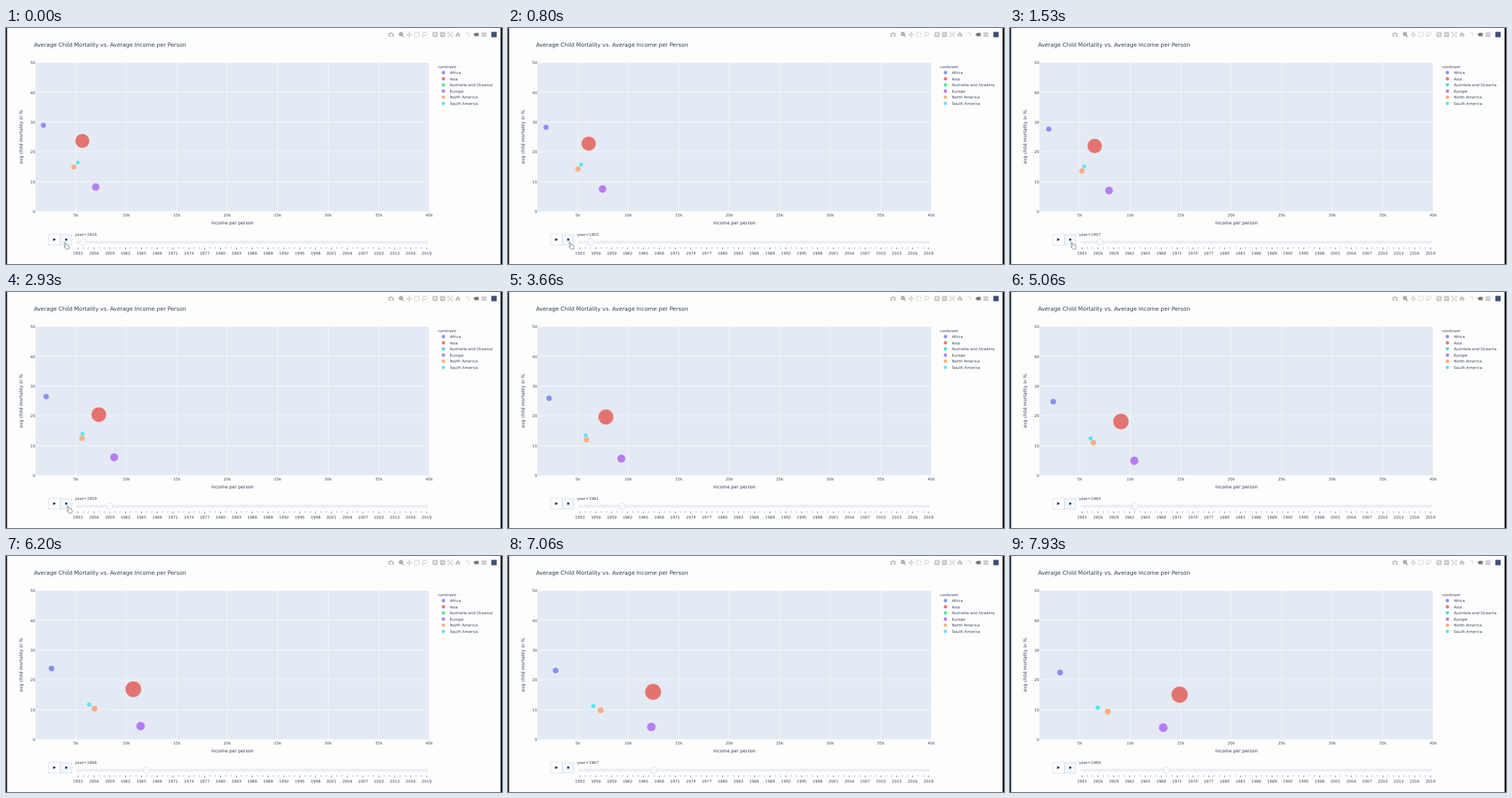
An HTML page that plays this animation: 690 by 328 pixels, repeating every 8 s.

```html
<!DOCTYPE html>
<html lang="en">
<head>
<meta charset="utf-8">
<title>Child Mortality vs. Income</title>
<style>
  html, body { margin: 0; width: 100%; height: 100%; overflow: hidden; background: #fdfdfd; }
  svg { display: block; width: 690px; height: 328px; }
  text { font: 5.38px "DejaVu Sans", Verdana, sans-serif; fill: #3a475c; white-space: pre; }
  .title { font-size: 7.69px; fill: #2c3a50; }
  .axis { font-size: 6.3px; fill: #2c3a50; }
  .mid { text-anchor: middle; }
  .end { text-anchor: end; }
  #grid { stroke: #fff; stroke-width: .55; }
  #bubbles { stroke: #f4f6fb; stroke-width: .3; }
  #ticks { stroke: #333c4c; stroke-width: .6; }
  .control { stroke: #bec8d9; stroke-width: .5; fill: #f8fafc; }
  .icons { fill: #c3c4c7; stroke: none; }
  .icons .line { fill: none; stroke: #c3c4c7; stroke-width: 1; }
  .icons .on { fill: #77797d; }
  .icons .line.on { fill: none; stroke: #77797d; }
</style>
</head>
<body>
<svg viewBox="0 0 690 328">
  <rect width="690" height="328" fill="#fdfdfd"/>
  <path d="M0 0H1.5V328H0ZM688 0H690V328H688Z" fill="#111"/>

  <g class="icons">
    <path d="M532 7h2l.7-1h2l.7 1h2v5h-7.4zM535.7 8a1.6 1.6 0 1 0 .1 0z" fill-rule="evenodd"/>
    <circle class="line on" cx="549.4" cy="8.4" r="2.3"/>
    <path class="line on" d="M551 10l2.4 2.6M548.3 8.4h2.2M549.4 7.3v2.2"/>
    <path class="line" d="M561 6v6.4M557.8 9.2h6.4"/>
    <path d="M561 5l1.5 1.8h-3zM561 13.2l1.5-1.8h-3zM557 9.2l1.8-1.5v3zM565 9.2l-1.8-1.5v3z"/>
    <rect class="line" x="568.5" y="6" width="6" height="6" stroke-dasharray="1.4 .8"/>
    <path class="line" d="M580 10.5c-2-2 0-4.5 2.8-4.5s3.7 2.4 1.6 3.8-3.6.2-4.4 1 .2 1.7 1 2"/>
    <path d="M593.3 5.7h7v6.8h-7zM596.3 7v1.6h-1.7v1h1.7v1.6h1V9.6h1.7v-1h-1.7V7z" fill-rule="evenodd"/>
    <path d="M603.8 5.7h7v6.8h-7zM605.2 8.6v1h4.2v-1z" fill-rule="evenodd"/>
    <path class="line" d="M615.3 6.3l5.4 5.6M620.7 6.3l-5.4 5.6"/>
    <path d="M614.4 5.6h2.4l-2.4 2.4zM621.6 5.6h-2.4l2.4 2.4zM614.4 12.6h2.4l-2.4-2.4zM621.6 12.6h-2.4l2.4-2.4z"/>
    <path d="M628.7 5.4l4 3.8h-1v3.3h-2.1v-2.3h-1.8v2.3h-2.1V9.2h-1z"/>
    <path class="line" d="M639 7h5M643.5 7v5.4" stroke-dasharray="1.5 .8"/>
    <path class="on" d="M650.4 9l2-2.3h5.2v4.7h-5.2z"/>
    <path d="M661 7.2l1-1h6.2v2.5H662zM661 10.8l1-1.2h6.2v2.6H662z"/>
  </g>
  <rect x="675.2" y="5.4" width="7.4" height="7.4" fill="#3f4f75"/>

  <text class="title" x="39" y="26">Average Child Mortality vs. Average Income per Person</text>
  <rect x="41" y="48" width="548" height="207" fill="#e4eaf3"/>
  <g id="grid"></g>
  <g id="labels"></g>
  <text class="axis mid" x="315" y="273.2">income per person</text>
  <text class="axis mid" transform="translate(22.8 151.5) rotate(-90)">avg child mortality in %</text>
  <text x="601" y="55.6">continent</text>
  <g id="legend"></g>
  <g id="bubbles"></g>

  <rect class="control" x="59.2" y="287" width="16.4" height="14.5" style="fill:#fff"/>
  <rect class="control" x="75.6" y="287" width="16.2" height="14.5" style="fill:#f1f7fd"/>
  <path d="M65.5 292l4.2 2.1-4.2 2.1zM82.3 292.7h2.9v2.9h-2.9z" fill="#1f2f4a"/>
  <text id="year" x="96" y="289.4"></text>
  <rect class="control" x="98.3" y="296.5" width="488" height="2.3" rx="1.1"/>
  <g id="ticks"></g>
  <circle id="handle" class="control" cy="297.7" r="4.5"/>
  <path id="cursor" d="M1.6 .6q.9-.7 1.4.4l.9 3 .5-.3q.7-.2 1 .5.8-.5 1.3.3.9-.2 1.2.7l.5 2q.1 1-.4 2.4l-3.7.8q-1-1.4-2.6-2.6-1-.9-.2-1.3.5-.2 1.6.6L1.4 1.9q-.2-.9.2-1.3z"
        fill="#fff" stroke="#444" stroke-width=".6"/>
</svg>
<script>
const LOOP = 8000, YEAR_MS = 512, FIRST_START = -76, FIRST_YEAR = 1954, SLIDE_MS = 150;
const $ = id => document.getElementById(id);

function add(parent, tag, attrs, text = "") {
  const el = document.createElementNS("http://www.w3.org/2000/svg", tag);
  for (const key in attrs) el.setAttribute(key, attrs[key]);
  el.textContent = text;
  return $(parent).appendChild(el);
}

// Each coordinate is start + drift * u + bend * u^power, with u running from 0 to 1.
const follow = ([start, drift, bend], power, u) => start + drift * u + bend * u ** power;

const continents = [
  { name: "Africa", color: "#8b8ff0", size: 3.7, x: [52, 9.5, 8.5], y: [135.2, 28, -1] },
  { name: "Asia", color: "#e37370", size: 9.9, x: [106.2, 60, 73], y: [157, 37, -1], power: 4.3 },
  { name: "Australia and Oceania", color: "#55dfbd", size: .7, x: [91.3, 44, 28.5], y: [197.8, 22.2, 0] },
  { name: "Europe", color: "#b67df2", size: 5.4, x: [124.8, 67, 22.5], y: [221, 27.5, -9.8] },
  { name: "North America", color: "#f6af85", size: 3.8, x: [94.5, 29, 13], y: [193.3, 29, -5.8] },
  { name: "South America", color: "#5ae4ef", size: 2.8, x: [100, 17, 5.3], y: [187, 29.5, -5.7] },
];

const yearX = year => 100.2 + (year - 1953) * 7.345;
const clamp = u => Math.min(1, Math.max(0, u));
const easeInOut = u => u < .5 ? 4 * u ** 3 : 1 - 4 * (1 - u) ** 3;

for (let k = 5; k <= 40; k += 5) {
  const x = 26.8 + k * 14.05;
  add("grid", "path", { d: `M${x} 48V255` });
  add("labels", "text", { class: "mid", x, y: 261.5 }, k + "k");
}
for (let p = 0; p <= 50; p += 10) {
  const y = 255 - p * 4.14;
  add("grid", "path", { d: `M41 ${y}H589` });
  add("labels", "text", { class: "end", x: 40.6, y: y + 2.1 }, p);
}
for (let year = 1953; year <= 2019; year++) {
  const x = yearX(year), major = (year - 1953) % 3 === 0;
  add("ticks", "path", { d: `M${x} 305V${major ? 307.6 : 306.4}` });
  if (major) add("labels", "text", { class: "mid", x, y: 314.8 }, year);
}
continents.forEach((c, i) => {
  const y = 62 + i * 8.56;
  add("legend", "circle", { cx: 608.5, cy: y, r: 2.4, fill: c.color });
  add("legend", "text", { x: 617.4, y: y + 2 }, c.name);
  c.dot = add("bubbles", "circle", { fill: c.color });
});

function draw() {
  const t = performance.now() % LOOP, u = t / LOOP;
  for (const c of continents) {
    c.dot.setAttribute("cx", follow(c.x, c.power ?? 3, u));
    c.dot.setAttribute("cy", follow(c.y, 2, u));
    c.dot.setAttribute("r", c.size * (1 + .16 * u));
  }

  const step = Math.floor((t - FIRST_START) / YEAR_MS), year = FIRST_YEAR + step;
  const slide = easeInOut(clamp((t - FIRST_START - step * YEAR_MS) / SLIDE_MS));
  const from = Math.max(FIRST_YEAR, year - 1);
  $("year").textContent = "year=" + year;
  $("handle").setAttribute("cx", yearX(from + (year - from) * slide));

  const nudge = easeInOut(clamp((t - 60) / 500));
  $("cursor").setAttribute("transform", `translate(${79.6 + 4 * nudge} 297.2)`);
  $("cursor").style.visibility = t < 3200 ? "visible" : "hidden";
  requestAnimationFrame(draw);
}
draw();
</script>
</body>
</html>
```
